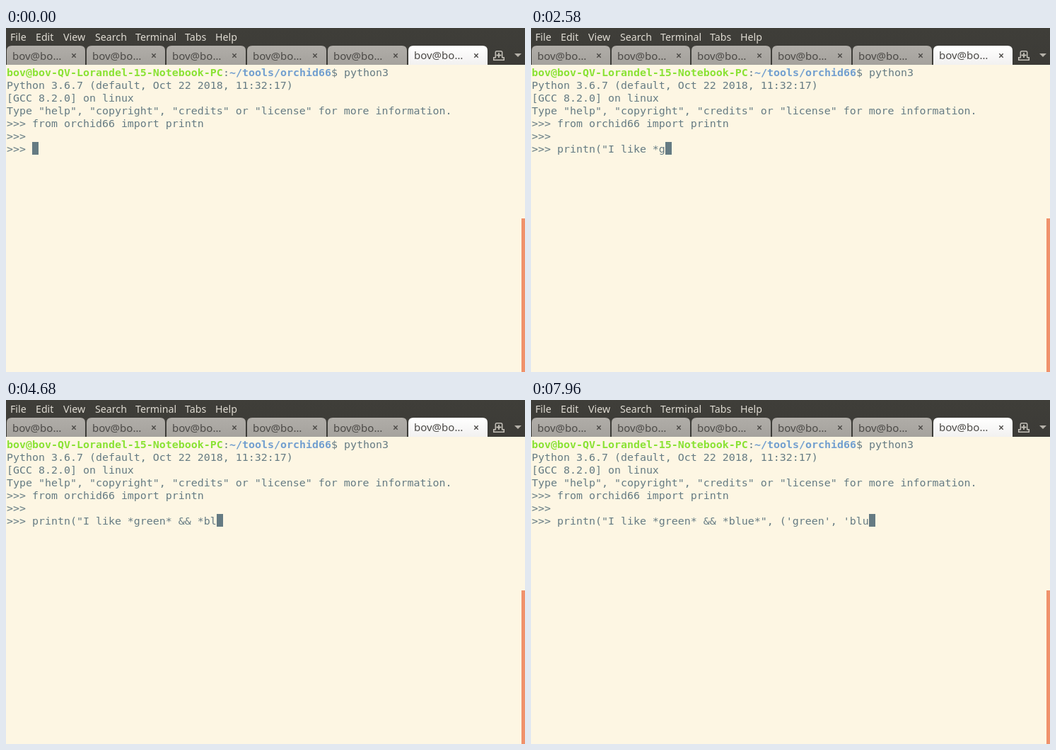
Recreate the animation shown at these times as an HTML page. Size 734 px wide and 486 px high, loop 8000 ms.

```html
<!DOCTYPE html>
<html lang="en">
<head>
<meta charset="utf-8">
<title>Terminal session</title>
<style>
  html, body { margin: 0; width: 100%; height: 100%; overflow: hidden; background: #fdf6e3; }
  svg { display: block; width: 734px; height: 486px; }
  text { white-space: pre; }
  .ui { font-family: "Noto Sans", "Open Sans", sans-serif; }
  .menu { font-size: 14.2px; fill: #dfdbd2; }
  .tab { font-size: 15px; fill: #4b4946; }
  .term { font: 14.95px "DejaVu Sans Mono", "Noto Sans Mono", monospace; fill: #657b83; }
  .bold { font-weight: bold; }
</style>
</head>
<body>
<svg id="stage" viewBox="0 0 734 486">
  <defs>
    <linearGradient id="bar" x2="0" y2="1">
      <stop offset="0" stop-color="#3f3e39"/><stop offset="1" stop-color="#3c3b37"/>
    </linearGradient>
    <linearGradient id="idle" x2="0" y2="1">
      <stop offset="0" stop-color="#b0ada8"/><stop offset="1" stop-color="#a5a29d"/>
    </linearGradient>
    <linearGradient id="active" x2="0" y2="1">
      <stop offset="0" stop-color="#ffffff"/><stop offset="1" stop-color="#f2f1f0"/>
    </linearGradient>
  </defs>
  <rect width="734" height="486" fill="#fdf6e3"/>
  <rect width="734" height="52" fill="url(#bar)"/>
  <g id="chrome"></g>
  <g fill="none" stroke="#c4c0b8" stroke-width="1.5">
    <path d="M689.7 45.3v-3.6h2.6V34.5q0-1.8 1.8-1.8h5.8q1.8 0 1.8 1.8v7.2h2.6v3.6z"/>
    <path d="M697 35v7M693.5 38.5h7" stroke-width="1.8"/>
  </g>
  <path d="M719 36h10l-5 5z" fill="#b5b1a9"/>
  <g id="screen"></g>
  <rect id="cursor" y="161" width="9" height="18" fill="#657b83"/>
  <rect x="729" y="269" width="5" height="217" fill="#f0926c"/>
</svg>
<script>
const LOOP = 8000, CELL = 9, ROW = 18;
const PROMPT = '>>> ';
const USER = 'bov', HOST = 'bov-QV-Lorandel-15-Notebook-PC';
const $ = id => document.getElementById(id);

function add(parent, tag, attrs, content = '') {
  const el = document.createElementNS('http://www.w3.org/2000/svg', tag);
  for (const name in attrs) el.setAttribute(name, attrs[name]);
  el.textContent = content;
  parent.append(el);
  return el;
}

function write(row, col, content, fill, bold) {
  const attrs = { x: 1 + col * CELL, y: 68 + row * ROW, class: bold ? 'term bold' : 'term' };
  if (fill) attrs.style = `fill:${fill}`;
  return add($('screen'), 'text', attrs, content);
}

const menu = { File: 6, Edit: 42, View: 81, Search: 126, Terminal: 183, Tabs: 253, Help: 296 };
for (const label in menu) {
  add($('chrome'), 'text', { x: menu[label], y: 18, class: 'ui menu' }, label);
}

const tabEdges = [1, 114, 227, 341, 455, 569, 683];
tabEdges.slice(0, -1).forEach((left, i) => {
  const right = tabEdges[i + 1] - 2, on = i === 5;
  add($('chrome'), 'path', {
    d: `M${left} 52V32q0-7 7-7H${right - 7}q7 0 7 7v20z`, fill: on ? 'url(#active)' : 'url(#idle)'
  });
  add($('chrome'), 'text', { x: left + 8, y: on ? 44 : 45, class: 'ui tab' }, USER + '@bo…');
  add($('chrome'), 'path', {
    d: `M${right - 18.7} 36.3l5.4 5.4m0-5.4l-5.4 5.4`, stroke: '#4b4946', 'stroke-width': 1.4
  });
});

const account = `${USER}@${HOST}`, path = '~/tools/orchid66';
const pathCol = account.length + 1;
write(0, 0, account, '#8ae234', true);
write(0, account.length, ':');
write(0, pathCol, path, '#729fcf', true);
write(0, pathCol + path.length, '$ python3');
[
  'Python 3.6.7 (default, Oct 22 2018, 11:32:17)',
  '[GCC 8.2.0] on linux',
  'Type "help", "copyright", "credits" or "license" for more information.',
  PROMPT + 'from orchid66 import printn',
  PROMPT
].forEach((line, i) => write(i + 1, 0, line));
const input = write(6, 0, PROMPT);

// Bursts of keys: text, time of first key, time of last key; "\b" deletes.
const bursts = [
  ['printn("I l', 60, 1080],
  ['ike gre', 1280, 1940],
  ['\b\b\b', 2100, 2240],
  ['*green* ', 2480, 3140],
  ['&& *', 3300, 4400],
  ['bl', 4640, 4680],
  ['ue*"', 4780, 5540],
  [', ', 5760, 5880],
  ["('green", 6060, 6820],
  ["', 'bl", 6920, 7780],
  ['u', 7960, 7960]
];
const keys = bursts.flatMap(([text, from, to]) => [...text].map((key, i) => ({
  key, time: from + (to - from) * i / Math.max(1, text.length - 1)
})));

function draw(t) {
  let typed = PROMPT;
  for (const { key, time } of keys) {
    if (time > t + 0.01) break;
    typed = key === '\b' ? typed.slice(0, -1) : typed + key;
  }
  if (input.textContent !== typed) input.textContent = typed;
  $('cursor').setAttribute('x', 1 + typed.length * CELL);
}

const start = performance.now();
function tick() {
  draw((performance.now() - start) % LOOP);
  requestAnimationFrame(tick);
}
draw(0);
requestAnimationFrame(tick);
</script>
</body>
</html>
```
